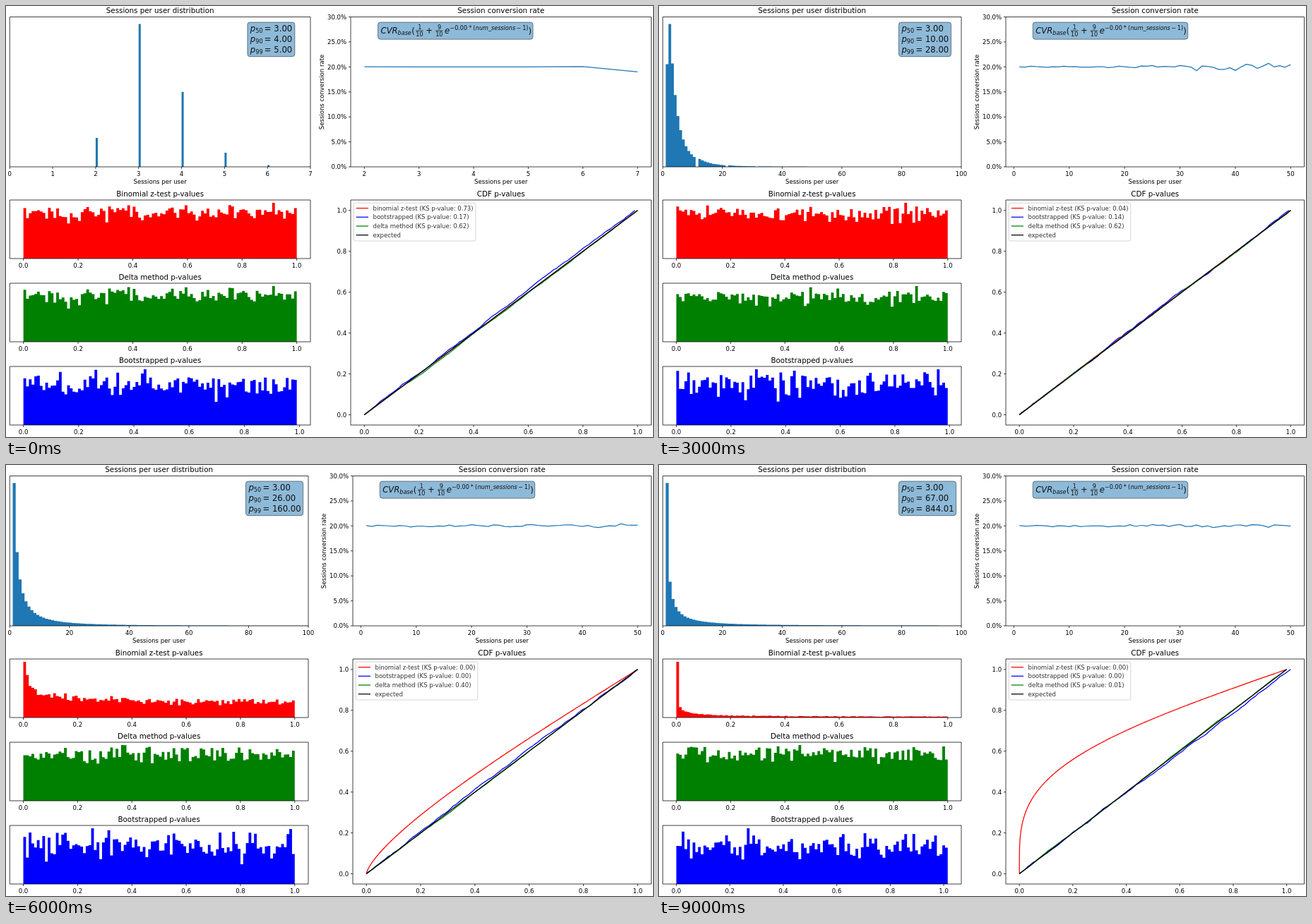
An HTML page that plays this animation: 916 px wide and 611 px high, repeating every 10000 ms.

```html
<!DOCTYPE html>
<html lang="en">
<head>
<meta charset="utf-8">
<title>P-value simulation</title>
<style>
  html, body { margin: 0; width: 100%; height: 100%; overflow: hidden; background: #fff; }
  svg { display: block; width: 100vw; height: 100vh; font-family: "DejaVu Sans", sans-serif; }
</style>
</head>
<body>
<svg id="stage" viewBox="0 0 916 611"></svg>
<script>
const STEP = 1000, COUNT = 10, BLUE = '#1f77b4', LEFT = 5.3, RIGHT = 913.5, USERS = 1e6;
const stage = document.getElementById('stage');

// Layout and labels per step; short lists fall back to a shared value.
const leftEnd = [431, 430, 432.5], rightStart = [488, 490, 486.5];
const maxSessions = [7, 25, 95, 92], rateEnd = [7, 25, 49], tickStep = [1, 5];
const p99 = [5, 9, 16, 28, 50, 90, 160, 295, 509, 844.01];
const ksRed = [.73, .39, .84, .04];
const ksBlue = [.17, 0, .04, .14];
const ksGreen = [.62, .14, .79, .62, .35, .17, .4, .55, .1, .01];
const bootMax = [.99, 1.006, 1.004, .9935, 1, .9935, 1, 1.003, 1, 1.015];

const range = (n, f) => Array.from({ length: n }, (_, j) => f(j));

function gauss(seed) {
  let s = seed * 7919 + 12345;
  const random = () => {
    s = s + 0x6D2B79F5 | 0;
    let t = Math.imul(s ^ s >>> 15, 1 | s);
    t = t + Math.imul(t ^ t >>> 7, 61 | t) ^ t;
    return ((t ^ t >>> 14) >>> 0) / 4294967296;
  };
  return () => (random() + random() + random() + random() - 2) * Math.sqrt(3);
}

function normal(x) {
  const a = Math.abs(x) / Math.SQRT2, t = 1 / (1 + .3275911 * a);
  const poly = t * (.254829592 + t * (-.284496736 + t * (1.421413741 + t * (-1.453152027 + t * 1.061405429))));
  const tail = poly * Math.exp(-a * a) / 2;
  return x < 0 ? tail : 1 - tail;
}

// CDF of two-sided p-values when the true deviation is k times the assumed one.
function pCdf(p, k) {
  if (p <= 0 || p >= 1) return p;
  let lo = 0, hi = 8;
  for (let n = 0; n < 40; n++) {
    const z = (lo + hi) / 2;
    if (2 * normal(-z) > p) lo = z; else hi = z;
  }
  return 2 * normal(-lo / k);
}

// Sessions per user are log-normal, rounded up.
const sigmaOf = i => .25 * (i + 1);
function share(n, sigma) {
  const below = v => v < 1 ? 0 : normal((Math.log(v) - 1) / sigma);
  return below(n) - below(n - 1);
}

const text = (s, x, y, size = 8.55, anchor = 'middle', more = '') =>
  `<text x="${x}" y="${y}" font-size="${size}" text-anchor="${anchor}" ${more}>${s}</text>`;
const title = (s, x, y) => text(s, x, y, 10.3);
const line = (pts, color, w = 1.25) =>
  `<polyline points="${pts.map(p => p.map(v => v.toFixed(2)).join()).join(' ')}" fill="none" stroke="${color}" stroke-width="${w}" stroke-linejoin="round"/>`;
const fill = (d, color) => `<path d="${d}" fill="${color}"/>`;
const bar = (x, w, y, h) => `M${x.toFixed(2)} ${y}h${w.toFixed(2)}v${(-h).toFixed(2)}h${(-w).toFixed(2)}z`;
const panel = (x, y, w, h) =>
  `<rect x="${x}" y="${y}" width="${w}" height="${h}" rx="3.6" fill="${BLUE}" fill-opacity=".5" stroke="#000" stroke-opacity=".5" stroke-width=".9"/>`;

// Frame with ticks; ticks are [position, label] pairs.
function axes(x0, y0, x1, y1, xTicks, yTicks = []) {
  let d = `M${x0} ${y0}H${x1}V${y1}H${x0}z`, labels = '';
  for (const [x, s] of xTicks) {
    d += `M${x} ${y1}v3`;
    labels += text(s, x, y1 + 12.8);
  }
  for (const [y, s] of yTicks) {
    d += `M${x0} ${y}h-3`;
    labels += text(s, x0 - 5.8, y + 3.2, 8.55, 'end');
  }
  return `<path d="${d}" fill="none" stroke="#000" stroke-width=".75"/>` + labels;
}
const unitTicks = pos => range(6, j => [pos(j / 5), (j / 5).toFixed(1)]);

function sessionsPlot(i, R) {
  const first = i ? 1 : 2, last = maxSessions[i] ?? 100, limit = i < 3 ? last : 100;
  const k = (R - LEFT) / limit, w = (last - first) / 100, mid = (LEFT + R) / 2;
  const shares = range(last + 1, n => n < first ? 0 : share(n, sigmaOf(i)));
  const top = Math.max(...shares);
  const d = shares.map((p, n) => {
    const bin = Math.min(99, Math.floor((n - first) / w + 1e-9));
    return p / top < .0005 ? '' : bar(LEFT + (first + bin * w) * k, w * k, 228, p / top * 202.4);
  }).join('');
  const step = tickStep[i] ?? 20;
  const ticks = range(Math.floor(limit / step) + 1, j => [LEFT + j * step * k, j * step]);
  return title('Sessions per user distribution', mid, 10.3) + fill(d, BLUE) +
    axes(LEFT, 15.5, R, 228, ticks) + text('Sessions per user', mid, 252.3) +
    quantiles(i, LEFT + .8 * (R - LEFT));
}

function quantiles(i, x) {
  const p90 = Math.ceil(Math.exp(1 + 1.28155 * sigmaOf(i)));
  const extra = String(Math.floor(p99[i])).length - 1;
  const rows = [[50, 3], [90, p90], [99, p99[i]]].map(([q, v], n) => {
    const y = 36.3 + n * 14.7;
    return text('p', x, y, 11.6, 'start', 'font-style="italic"') + text(q, x + 7.4, y + 1.9, 8.1, 'start') +
      text('=', x + 20, y, 11.6, 'start') + text(v.toFixed(2), x + 33.5, y, 11.6, 'start');
  });
  return panel(x - 4, 23, 67 + extra * 7.1, 48.7) + `<g fill="#111">${rows.join('')}</g>`;
}

function formula(x) {
  const put = (s, dx, y, size, italic) =>
    text(s, x + dx, y, size, 'start', italic ? 'font-style="italic"' : '');
  const main = (s, dx, italic) => put(s, dx, 38.8, 11.6, italic);
  const power = (s, dx, italic) => put(s, dx, 34.4, 8.1, italic);
  const frac = (top, dx) => put(top, dx + 2.8, 33.3, 8.1) + put('10', dx, 43, 8.1) +
    `<path d="M${x + dx} 35h10.4" stroke="#111" stroke-width=".75"/>`;
  return panel(x - 4, 23, 219.5, 24.2) + '<g fill="#111">' +
    main('CVR', 0, true) + put('base', 24, 41, 8.1, true) + main('(', 43.6) +
    frac('1', 49.8) + main('+', 63.8) + frac('9', 77.6) + main('e', 90.4, true) +
    power('−0.00', 97.8) + power('*', 124.6) + power('(', 130.8) + power('num_sessions', 134.2, true) +
    power('−', 192) + power('1', 200.6) + power(')', 205.8) + main(')', 209) + '</g>';
}

// The rate is estimated from fewer sessions, so more noisily, for rare counts.
function ratePlot(i, L) {
  const first = i ? 1 : 2, last = rateEnd[i] ?? 50, pad = (RIGHT - L) / 22, mid = (L + RIGHT) / 2;
  const X = n => L + pad + (n - first) / (last - first) * (RIGHT - L - 2 * pad);
  const Y = v => 228 - v / 30 * 212.5;
  const g = gauss(i + 500), pts = [];
  for (let n = first; n <= last; n++) {
    const users = USERS * share(n, sigmaOf(i));
    if (users < 20 && n < last) continue;
    const sd = Math.min(.8, 40 / Math.sqrt(n * users));
    pts.push([X(n), Y(20 + sd * g())]);
  }
  const step = tickStep[i] ?? 10, from = i ? 0 : 2;
  const xTicks = range(Math.ceil((last - from) / step) + 1, j => [X(from + j * step), from + j * step]);
  const yTicks = range(7, j => [Y(j * 5), (j * 5).toFixed(1) + '%']);
  return title('Session conversion rate', mid, 10.3) + line(pts, BLUE) +
    axes(L, 15.5, RIGHT, 228, xTicks, yTicks) + text('Sessions per user', mid, 252.3) +
    text('Sessions conversion rate', 0, 0, 8.55, 'middle', `transform="translate(${L - 37.8} 122) rotate(-90)"`) +
    formula(L + .1 * (RIGHT - L));
}

// Relative counts of p-values in 100 bins.
const counts = (noise, sd, k = 1) => noise.map((e, j) => {
  const b = 100 * (pCdf((j + 1) / 100, k) - pCdf(j / 100, k));
  return b + sd * Math.sqrt(b) * e;
});

function pValuePlot(name, y0, R, color, bins, max = 1) {
  const pad = (R - LEFT) / 22, x0 = LEFT + pad, w = R - LEFT - 2 * pad, y1 = y0 + 83;
  const top = Math.max(...bins);
  const d = bins.map((v, j) => bar(x0 + j * w / 100, w / 100, y1, v / top * 79)).join('');
  return title(name, (LEFT + R) / 2, y0 - 5) + fill(d, color) +
    axes(LEFT, y0, R, y1, unitTicks(v => x0 + v * w / max));
}

function cdfPlot(i, L, k, green, blue) {
  const pad = (RIGHT - L) / 22, full = Math.max(1, bootMax[i]), mid = (L + RIGHT) / 2;
  const X = v => L + pad + v / full * (RIGHT - L - 2 * pad);
  const Y = v => 579.5 - v * 289.7;
  const cumulative = (bins, end = 1) => {
    const total = bins.reduce((a, b) => a + b);
    let sum = 0;
    return [[X(0), Y(0)], ...bins.map((v, j) => [X((j + 1) / 100 * end), Y((sum += v) / total)])];
  };
  const red = range(201, j => {
    const x = (j / 200) ** 2;
    return [X(x), Y(pCdf(x, k))];
  });
  return title('CDF p-values', mid, 270) + line(red, 'red') + line(cumulative(blue, bootMax[i]), 'blue') +
    line(cumulative(green), 'green') + line([[X(0), Y(0)], [X(1), Y(1)]], '#000') +
    axes(L, 275, RIGHT, 594, unitTicks(X), unitTicks(Y)) + legend(i, L);
}

function legend(i, L) {
  const ks = v => ` (KS p-value: ${(v ?? 0).toFixed(2)})`;
  const rows = [
    ['red', 'binomial z-test' + ks(ksRed[i])], ['blue', 'bootstrapped' + ks(ksBlue[i])],
    ['green', 'delta method' + ks(ksGreen[i])], ['#000', 'expected']
  ];
  return `<rect x="${L + 4.3}" y="279.3" width="172.5" height="53.7" rx="1.8" fill="#fff" fill-opacity=".8" stroke="#ccc" stroke-width=".8"/>` +
    rows.map(([color, s], n) => {
      const y = 286.6 + n * 12.7;
      return line([[L + 7.7, y], [L + 25, y]], color) + text(s, L + 31.5, y + 3.1, 8.5, 'start', 'fill="#333"');
    }).join('');
}

function draw(i) {
  const R = leftEnd[i] ?? 428, L = rightStart[i] ?? 491;
  const noise = seed => range(100, gauss(i * 3 + seed));
  // The z-test grows overconfident, and less like the delta method, as the spread grows.
  const k = Math.sqrt(1 + (sigmaOf(i) / 2) ** 6), rho = .97 - .1 * i;
  const e = noise(1), own = noise(2);
  const red = counts(e, .1, k);
  const green = counts(e.map((v, j) => rho * v + Math.sqrt(1 - rho * rho) * own[j]), .1);
  const blue = counts(noise(3), .18);
  return sessionsPlot(i, R) + ratePlot(i, L) +
    pValuePlot('Binomial z-test p-values', 275, R, 'red', red) +
    pValuePlot('Delta method p-values', 393, R, 'green', green) +
    pValuePlot('Bootstrapped p-values', 511, R, 'blue', blue, bootMax[i]) +
    cdfPlot(i, L, k, green, blue);
}

let shown = -1;
function tick() {
  const i = Math.floor(performance.now() / STEP) % COUNT;
  if (i !== shown) stage.innerHTML = draw(shown = i);
  requestAnimationFrame(tick);
}
tick();
</script>
</body>
</html>
```
